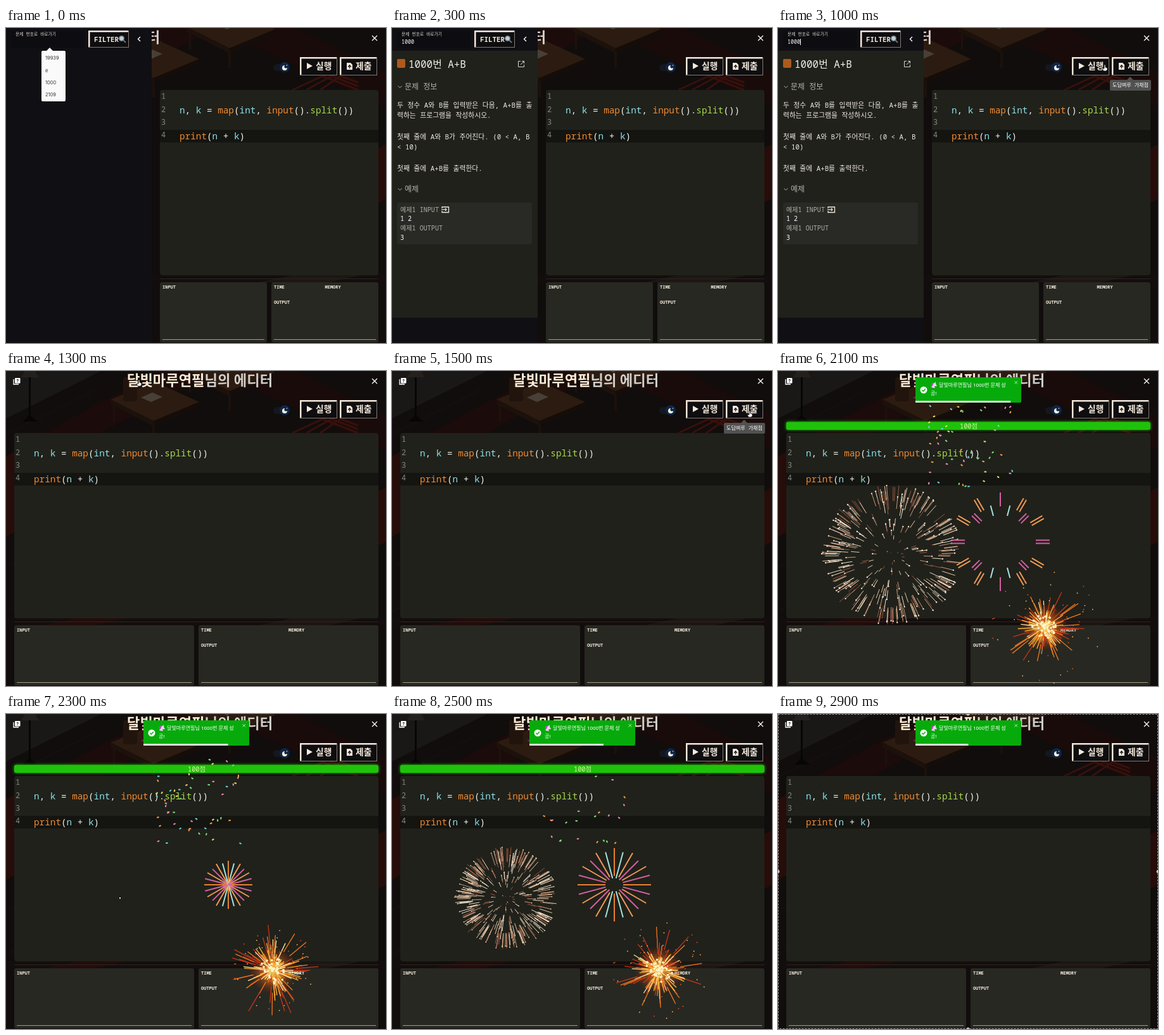
An HTML page with a canvas that plays this animation: 600x498 px, repeating every 3 s.

```html
<!DOCTYPE html>
<html lang="ko">
<head>
<meta charset="utf-8">
<style>
  html, body { margin: 0; width: 600px; height: 498px; overflow: hidden; background: #0e0b0b; }
  canvas { display: block; }
</style>
</head>
<body>
<canvas id="stage" width="600" height="498"></canvas>
<script>
const c = document.getElementById('stage').getContext('2d');
const MONO = '"Noto Sans Mono", "Noto Sans CJK KR", monospace';
const SANS = 'Roboto, "Noto Sans CJK KR", sans-serif';
const USER = '달빛마루연필', SITE = '도담벼루';
const CREAM = '#f4e9dc', PANEL = '#20211b', SIDE = '#100f14';
const TAU = Math.PI * 2;

const rand = (i, k) => {
  const s = Math.sin(i * 12.9898 + k * 78.233) * 43758.5453;
  return s - Math.floor(s);
};

function rect(x, y, w, h, color, r = 0) {
  c.fillStyle = color;
  c.beginPath();
  c.roundRect(x, y, w, h, r);
  c.fill();
}

function dot(x, y, r, color) {
  c.fillStyle = color;
  c.beginPath();
  c.arc(x, y, r, 0, TAU);
  c.fill();
}

function trace(points) {
  c.beginPath();
  for (let i = 0; i < points.length; i += 2) c.lineTo(points[i], points[i + 1]);
}

function line(points, color, width = 1) {
  trace(points);
  c.strokeStyle = color;
  c.lineWidth = width;
  c.stroke();
}

function poly(points, color) {
  trace(points);
  c.fillStyle = color;
  c.fill();
}

// Text centred vertically on y; returns the x where it ends.
function text(s, x, y, size, color, weight = 400, family = MONO, align = 'left') {
  c.font = `${weight} ${size}px ${family}`;
  c.textAlign = align;
  c.textBaseline = 'alphabetic';
  c.fillStyle = color;
  c.fillText(s, x, y + size * 0.36);
  return x + c.measureText(s).width;
}

function pixelButton(x, y, w, h) {
  rect(x, y, w, h, '#0e0d0f', 2);
  c.strokeStyle = '#827b76';
  c.lineWidth = 1;
  c.strokeRect(x + .5, y + .5, w - 1, h - 1);
  rect(x, y, w - 1, 2.5, CREAM, 1);
  rect(x, y, 2.5, h - 1, CREAM, 1);
}

function table(x, y) {
  poly([x, y, x + 70, y - 28, x + 140, y + 4, x + 68, y + 34], '#2c1b10');
  poly([x, y, x + 68, y + 34, x + 68, y + 42, x, y + 8], '#1c110b');
  poly([x + 68, y + 34, x + 140, y + 4, x + 140, y + 12, x + 68, y + 42], '#150d09');
  poly([x + 48, y - 3, x + 66, y - 11, x + 82, y - 4, x + 64, y + 4], '#474037');
  rect(x + 4, y + 8, 3, 28, '#1c110b');
  rect(x + 66, y + 40, 4, 25, '#1c110b');
}

function background() {
  rect(0, 0, 600, 498, '#100d0c');
  poly([0, 0, 150, 0, 0, 75], '#1a1817');
  poly([60, 98, 240, 0, 330, 0, 150, 98], '#1b0b0a');
  poly([330, 0, 460, 0, 600, 70, 600, 125], '#190b0a');
  poly([0, 135, 13, 128, 13, 255, 0, 262], '#260d0a');
  poly([588, 190, 600, 184, 600, 270, 588, 276], '#260d0a');
  for (let i = 0; i < 6; i++) line([0, 30 + i * 70, 150 - i * 10, -45 + i * 75], '#161312');
  for (let i = 0; i < 3; i++)
    line([452 + i * 22, 98, 500 + i * 14, 76, 556, 98 - i * 6], '#38100c', 3);
  rect(0, 391, 600, 11, '#130e0d');
  poly([60, 402, 110, 391, 190, 391, 140, 402], '#230c0a');
  poly([400, 402, 450, 391, 560, 391, 510, 402], '#1d1613');
  table(165, 45);
  table(285, -2);
  rect(185, 10, 22, 38, '#21140d', 3);
  rect(36, 0, 3, 72, '#070606');
  poly([24, 10, 30, 0, 46, 0, 52, 10], '#24201d');
  poly([26, 80, 37, 70, 50, 80], '#070606');
}

function code(x) {
  const O = '#f28a30', B = '#8be0e8', G = '#a6d94a', W = '#f0f0ea';
  const rows = [
    [130, ['n', B], [', ', W], ['k', B], [' = ', W], ['map', O], ['(', W], ['int', B], [', ', W],
      ['input', O], ['().', W], ['split', G], ['())', W]],
    [171, ['print', O], ['(', W], ['n', B], [' + ', W], ['k', B], [')', W]]
  ];
  for (const [y, ...parts] of rows) {
    let at = x;
    for (const [s, color] of parts) at = text(s, at, y, 14.33, color, 500);
  }
}

function editor(left) {
  const width = 588 - left;
  rect(left, 98, width, 293, PANEL, 4);
  rect(left, 161, width, 20, '#141411');
  [108, 129, 149, 169].forEach((y, i) => text(i + 1, left + 2, y, 12, '#85867f'));
  code(left + 31);
  line([left, 396.5, 588, 396.5], '#2a2522');

  const w = (width - 7) / 2, right = left + w + 7;
  for (const x of [left, right]) {
    rect(x, 402, w, 95, '#272822', 3);
    line([x + 4, 492.5, x + w - 4, 492.5], '#a79d8d');
  }
  text('INPUT', left + 4, 409, 7, CREAM, 700);
  text('TIME', right + 4, 409, 7, CREAM, 700);
  text('MEMORY', right + w / 2, 409, 7, CREAM, 700);
  text('OUTPUT', right + 4, 433, 7, CREAM, 700);
}

function toolbar() {
  line([578, 12, 586, 20], '#fff', 1.2);
  line([586, 12, 578, 20], '#fff', 1.2);
  rect(422, 57, 24, 11, '#15171f', 6);
  dot(440, 62, 8, '#0d2547');
  dot(440, 63, 4, '#fff3df');
  dot(442, 61, 2.6, '#0d2547');
  dot(443.5, 59, .8, '#fff3df');

  pixelButton(464, 46, 59, 29);
  poly([475, 55, 484, 60, 475, 65], CREAM);
  text('실행', 489, 60, 13.8, CREAM, 800, SANS);
  pixelButton(527, 46, 59, 29);
  poly([538, 55, 544, 55, 547, 58, 547, 66, 538, 66], CREAM);
  line([542.5, 64, 542.5, 59, 540, 61.5], '#111', 1.2);
  line([542.5, 59, 545, 61.5], '#111', 1.2);
  text('제출', 552, 60, 13.8, CREAM, 800, SANS);
}

function title(x) {
  const end = text(USER, x, 15, 22.2, '#ffecd6', 900, SANS);
  text('님의 에디터', end, 15, 22.2, '#d3cfcb', 900, SANS);
}

function helpIcon() {
  line([12, 13, 12, 21, 20, 21], '#fff', 1.3);
  rect(14, 11, 8.5, 8.5, '#fff', 1);
  text('?', 18.2, 15.3, 7, '#111', 700, SANS, 'center');
}

function sidebar(t) {
  rect(0, 0, 230, 498, SIDE);
  rect(8, 5, 116, 26, '#0d0c10', 2);
  text('문제 번호로 바로가기', 15, 10, 6.75, '#dcd6d0');
  if (t >= 100) text('1000', 15, 22, 8.3, '#fff');
  if (t >= 600 && t % 400 >= 200) line([35.5, 17, 35.5, 27], '#fff');
  pixelButton(130, 4, 64, 27);
  text('FILTER', 139, 18, 10.8, CREAM, 700);
  line([185, 19, 189, 23], '#6b7178', 2);
  dot(182.5, 16.5, 4.5, '#79838c');
  dot(182.5, 16.5, 3, '#b8d2de');
  line([212, 14, 208.5, 17.5, 212, 21], '#fff', 1.4);
  if (t >= 200) problem();
  if (t < 100) {
    rect(56, 36, 38, 80, '#fafafa', 2);
    poly([64, 36, 69, 31, 74, 36], '#fafafa');
    ['19939', 'e', '1000', '2109'].forEach((s, i) =>
      text(s, 62, 47.5 + i * 19.3, 7.5, '#333', 400, 'Inter, sans-serif'));
  }
}

function problem() {
  rect(0, 36, 230, 422, PANEL);
  rect(8, 49, 13, 14, '#ad5a1c', 2);
  text('1000번 A+B', 26, 57, 15.9, '#f3eee8', 500);
  line([203, 52.5, 199.5, 52.5, 199.5, 61.5, 208.5, 61.5, 208.5, 58], '#d8d4ce');
  line([205, 52.5, 208.5, 52.5, 208.5, 56], '#d8d4ce');
  line([203, 58, 208.5, 52.5], '#d8d4ce');
  for (const [s, y] of [['문제 정보', 93], ['예제', 255]]) {
    line([9.5, y - 1.5, 12.5, y + 1.5, 15.5, y - 1.5], '#b5b3ad');
    text(s, 20, y, 12, '#b5b3ad');
  }
  const body = [
    ['두 정수 A와 B를 입력받은 다음, A+B를 출', 122], ['력하는 프로그램을 작성하시오.', 138],
    ['첫째 줄에 A와 B가 주어진다. (0 < A, B', 172], ['< 10)', 188],
    ['첫째 줄에 A+B를 출력한다.', 222]
  ];
  for (const [s, y] of body) text(s, 8, y, 10.8, '#efe9e2');
  rect(8, 276, 213, 66, '#292a25', 3);
  text('예제1 INPUT', 13, 287, 10.1, '#b0ada7');
  text('1 2', 13, 301, 10.1, '#fff');
  text('예제1 OUTPUT', 13, 316, 10.1, '#b0ada7');
  text('3', 13, 331, 10.1, '#fff');
  line([79, 285, 79, 283, 89.5, 283, 89.5, 291.5, 79, 291.5, 79, 289], CREAM, 1.3);
  line([78, 287, 86, 287], CREAM, 1.2);
  line([84, 285, 86, 287, 84, 289], CREAM, 1.2);
}

function tooltip() {
  rect(524, 82, 65, 17, '#505150', 2);
  poly([551, 82, 556, 77, 561, 82], '#505150');
  text(SITE + ' 가채점', 556.5, 90.5, 8.1, '#fff', 400, MONO, 'center');
}

function pointer(t) {
  const path = [[800, 565, 68], [900, 565, 68], [1000, 516, 63], [1200, 210, 19],
    [1300, 210, 19], [1500, 565, 68], [1900, 565, 68]];
  const i = path.findIndex(p => p[0] > t);
  if (i < 1) return;
  const [a, b] = [path[i - 1], path[i]];
  const k = (t - a[0]) / (b[0] - a[0]);
  const x = a[1] + (b[1] - a[1]) * k, y = a[2] + (b[2] - a[2]) * k;
  const hand = [x - 1, y - 5, x + 1, y - 5, x + 1, y - 1, x + 4, y, x + 4, y + 3,
    x + 2, y + 5, x - 2, y + 5, x - 4, y + 1, x - 1, y + 1, x - 1, y - 5];
  poly(hand, '#fff');
  line(hand, '#111', .8);
}

function toast(t) {
  rect(217, 10, 167, 40, '#06ab0b', 2);
  dot(230, 30, 5.5, '#fff');
  line([227.3, 30, 229.3, 32, 232.8, 28], '#06ab0b', 1.3);
  poly([242, 26, 243, 20, 247, 19, 249, 17, 249, 20, 251, 24, 247, 24, 248, 27], '#eed5f5');
  poly([242, 26, 242, 20, 246, 18, 245, 22], '#c04bc0');
  text(USER + '님 1000번 문제 성', 254, 22, 8.07, '#fff', 400, SANS);
  text('공!', 241, 35, 8.07, '#fff', 400, SANS);
  line([373.5, 16, 378, 20.5], '#b6e8b8');
  line([378, 16, 373.5, 20.5], '#b6e8b8');
  rect(217, 47, 167 * (1 - (t - 1900) / 2000), 3, '#d5f3d6');
}

function scoreBar() {
  c.shadowColor = '#1fc40a';
  c.shadowBlur = 4;
  rect(13, 80.5, 575, 12.5, '#1fc20a', 3);
  c.shadowBlur = 0;
  text('100점', 301, 87, 10.3, '#d9f5a8', 400, MONO, 'center');
}

function ray(x, y, a, r0, r1, color, width, side = 0) {
  const u = Math.cos(a), v = Math.sin(a);
  line([x + u * r0 - v * side, y + v * r0 + u * side,
    x + u * r1 - v * side, y + v * r1 + u * side], color, width);
}

// Streaks leaving the centre of a sphere, seen from the front.
function shell(p) {
  const size = 116 * (1 - (1 - p) ** 3);
  for (let i = 0; i < 330; i++) {
    const a = rand(i, 1) * TAU, z = rand(i, 2) * 2 - 1;
    const r = size * Math.sqrt(1 - z * z) * (.93 + rand(i, 3) * .07);
    const color = ['#f7dcb8', '#d8a482', '#a35d48', '#fff3dc'][i % 4];
    ray(180, 291, a, r * (.66 + p * .2), r, color, .9);
    if (i % 2) dot(180 + Math.cos(a) * r, 291 + Math.sin(a) * r, .5 + p, p > .5 ? '#ffe0d2' : '#ffe9b5');
  }
}

function star(p) {
  const pink = '#d3609f', orange = '#ee9a55', cyan = '#a5e4df';
  const kinds = [[p > .5 ? pink : '#e38231', 1], [pink, 1], [orange, 1], [pink, .78], [orange, 1],
    [cyan, .76], [p > .5 ? pink : '#e38231', 1]];
  for (let i = 0; i < 24; i++) {
    const q = i % 12, k = q > 6 ? 12 - q : q;
    if (k === 1 && p > .5) continue;
    const [color, size] = kinds[k];
    const inner = Math.max(0, 126 * p - 28) * size, outer = (38 + 60 * p) * (p > .5 ? size : 1 - (1 - size) / 3);
    const sides = p > .5 && k < 5 ? [-2.5, 2.5] : [0];
    for (const side of sides) ray(351, 270, i * TAU / 24, inner, outer, color, 2, side);
  }
}

function sparks(t, p) {
  const seed = t / 100, reach = 76 - p * 14;
  const glow = c.createRadialGradient(421, 405, 2, 421, 405, 38);
  glow.addColorStop(0, '#ffd870');
  glow.addColorStop(.4, '#e8781899');
  glow.addColorStop(1, '#b0200000');
  dot(421, 405, 38, glow);
  for (let i = 0; i < 150; i++) {
    const a = rand(i, seed) * TAU, r = reach * (.25 + .75 * rand(i, seed + 40) ** 1.7);
    const color = ['#c9361a', '#f07a1c', '#ffb93d', '#ffe9a0'][i % 4];
    ray(421, 405, a, r * (i % 4 < 2 ? .5 : .25), r * (i % 4 < 2 ? 1 : .65), color, 1.3);
  }
  for (let i = 0; i < 45; i++) {
    const a = rand(i, 5) * TAU, r = 30 + rand(i, 6) * (35 + p * 38);
    dot(421 + Math.cos(a) * r, 405 + Math.sin(a) * r, .9, i % 2 ? '#e0552a' : '#ffb45c');
  }
  for (let i = 0; i < 40; i++) {
    const a = rand(i, 8) * TAU, r = rand(i, seed) * 22;
    dot(421 + Math.cos(a) * r, 405 + Math.sin(a) * r, 1.8, '#fff3c4');
  }
}

function confetti(t) {
  const colors = ['#62d8e0', '#f4dc62', '#f08ac0', '#7be07a', '#f5a24c'];
  for (let i = 0; i < 60; i++) {
    const k = (t - 2100) / 400;
    const y = 45 + 140 * rand(i, 11) ** 1.6 + (50 + 70 * rand(i, 12)) * k;
    if (y < 52 || y > 205 || (t > 2300 && i % 5 < 2)) continue;
    c.save();
    c.translate(305 + (rand(i, 13) - .5) * 135, y);
    c.rotate(rand(i, 14) * TAU + k * 5);
    rect(-1.5, -1, 3.5, 2, colors[i % 5]);
    c.restore();
  }
}

function selection() {
  c.setLineDash([3, 2]);
  c.strokeStyle = '#9b9894';
  c.lineWidth = 1;
  c.strokeRect(.5, .5, 599, 497);
  c.setLineDash([]);
  for (const [x, y] of [[0, 249], [600, 249], [300, 0], [300, 498]]) dot(x, y, 2.5, '#c8c6c3');
}

function draw(t) {
  const open = t < 1300, party = t >= 1900 && t < 2800;
  background();
  title(open ? 13 : 191);
  if (!open) helpIcon();
  toolbar();
  editor(open ? 243 : 13);
  if (open) sidebar(t);
  if ((t >= 800 && t <= 1000) || (t >= 1500 && t < 1900)) tooltip();
  pointer(t);
  if (party) {
    const p = ((t - 1700) % 600) / 600;
    scoreBar();
    shell(p);
    star(p);
    sparks(t, p);
    confetti(t);
  }
  if (t >= 1900) toast(t);
  if (t >= 2900) selection();
}

const start = performance.now();
function tick() {
  const t = (performance.now() - start) % 3000;
  draw(Math.floor(t / 100) * 100);
  requestAnimationFrame(tick);
}
tick();
</script>
</body>
</html>
```
